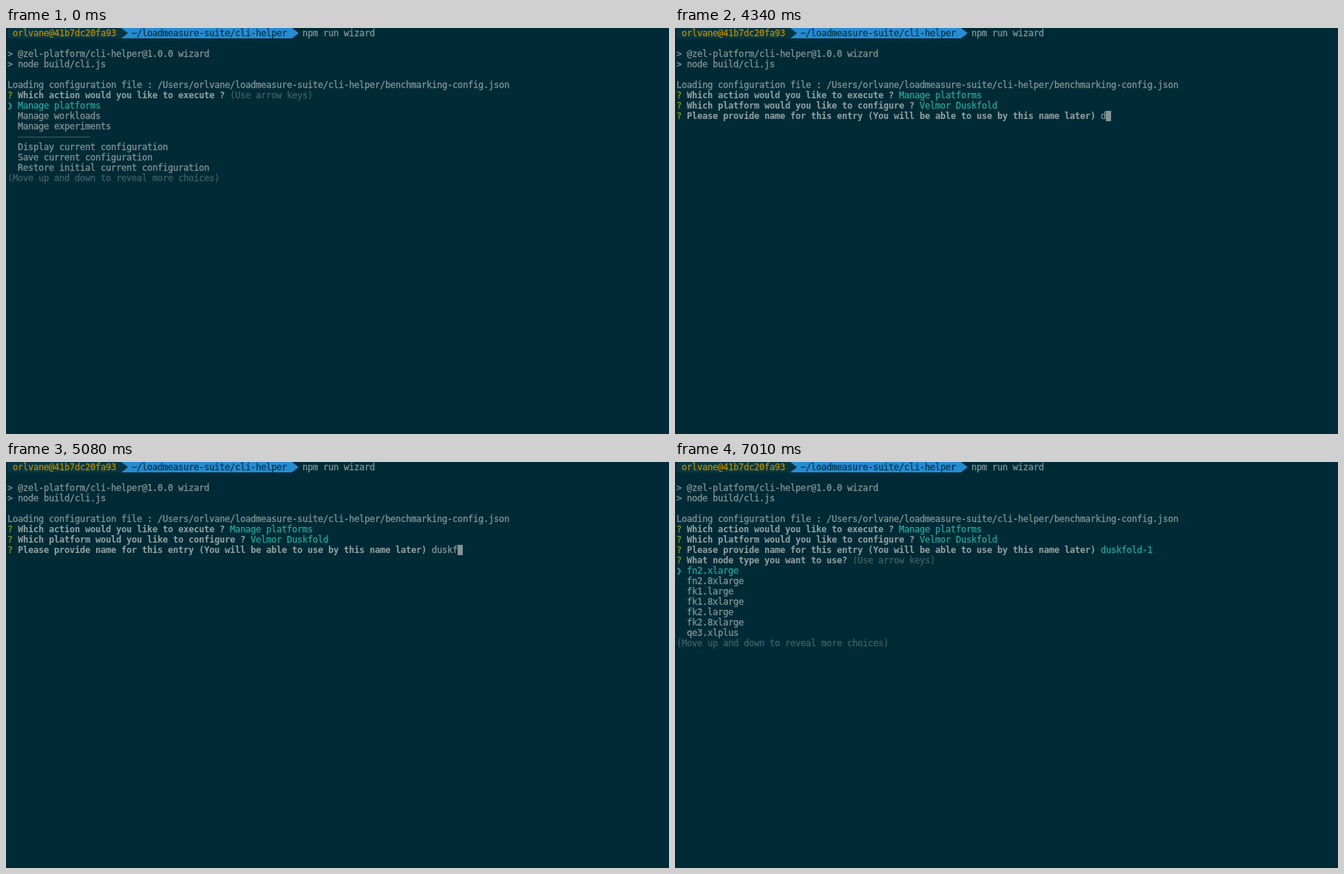
These frames come from a looping animation (897x549 px, 8 s). An HTML page with a canvas:

```html
<!DOCTYPE html>
<html lang="en">
<head>
<meta charset="utf-8">
<title>Terminal wizard</title>
<style>
  html, body { margin: 0; width: 100%; height: 100%; overflow: hidden; background: #002b36; }
  canvas { display: block; }
</style>
</head>
<body>
<canvas id="stage" width="897" height="549"></canvas>
<script>
const ctx = document.getElementById('stage').getContext('2d');
const LOOP = 8000, CELL = 7, LINE = 14, LEFT = 2, BASELINE = 11;
const FONT = '12px "DejaVu Sans Mono", "Noto Sans Mono", monospace';
const C = {
  bg: '#002b36', panel: '#073642', text: '#839496', bright: '#93a1a1', dim: '#415f66',
  green: '#859900', cyan: '#2aa198', yellow: '#b58900', blue: '#268bd2'
};

const PLATFORM = 'Velmor Duskfold', ENTRY = 'duskfold-1';
const PLATFORM_AT = 1190, NAME_AT = 2540, NODE_AT = 7010;
const KEY_TIMES = [4340, 4490, 4780, 4930, 5080, 5380, 5520, 5670, 6270, 6410];

const ACTIONS = ['Manage platforms', 'Manage workloads', 'Manage experiments', null,
  'Display current configuration', 'Save current configuration',
  'Restore initial current configuration'];
const PLATFORMS = [PLATFORM, null, 'Return to the previous menu', 'Exit CLI', null];
const NODES = ['fn2.xlarge', 'fn2.8xlarge', 'fk1.large', 'fk1.8xlarge',
  'fk2.large', 'fk2.8xlarge', 'qe3.xlplus'];

const cellX = col => LEFT + col * CELL;

// Every glyph sits on the terminal's whole-pixel cell grid.
function write(row, col, text, color = C.text, bold = false) {
  ctx.font = (bold ? 'bold ' : '') + FONT;
  ctx.fillStyle = ctx.strokeStyle = color;
  ctx.lineWidth = 0.3;
  [...text].forEach((ch, i) => {
    if (ch === ' ') return;
    const x = cellX(col + i), y = row * LINE + BASELINE;
    ctx.fillText(ch, x, y);
    if (!bold) ctx.strokeText(ch, x, y);
  });
}

function box(row, col, cells, color) {
  ctx.fillStyle = color;
  ctx.fillRect(cellX(col), row * LINE, cells * CELL, LINE);
}

function arrow(col, color) {
  const x = cellX(col);
  ctx.fillStyle = color;
  ctx.beginPath();
  ctx.moveTo(x, 0);
  ctx.lineTo(x + 9, LINE / 2);
  ctx.lineTo(x, LINE);
  ctx.fill();
}

function header() {
  box(0, 0, 22, C.panel);
  box(0, 22, 33, C.blue);
  arrow(22, C.panel);
  arrow(55, C.blue);
  write(0, 1, 'orlvane@41b7dc20fa93', C.yellow);
  write(0, 24, '~/loadmeasure-suite/cli-helper', C.panel);
  write(0, 57, 'npm run wizard');
  write(2, 0, '> @zel-platform/cli-helper@1.0.0 wizard');
  write(3, 0, '> node build/cli.js');
  write(5, 0, 'Loading configuration file : ' +
    '/Users/orlvane/loadmeasure-suite/cli-helper/benchmarking-config.json');
}

// Writes a question and returns the column where its answer begins.
function question(row, text) {
  write(row, 0, '?', C.green);
  write(row, 2, text, C.bright, true);
  return text.length + 3;
}

function answered(row, text, answer) {
  write(row, question(row, text), answer, C.cyan);
}

function menu(row, text, items, more = false) {
  write(row, question(row, text), '(Use arrow keys)', C.dim);
  write(row + 1, 0, '❯', C.cyan);
  items.forEach((item, i) => {
    const r = row + 1 + i;
    if (item) return write(r, 2, item, i ? C.text : C.cyan);
    ctx.fillStyle = C.dim;
    ctx.fillRect(cellX(2), r * LINE + 7, 14 * CELL, 1);
  });
  if (more) write(row + 1 + items.length, 0, '(Move up and down to reveal more choices)', C.dim);
}

function draw(t) {
  ctx.fillStyle = C.bg;
  ctx.fillRect(0, 0, 897, 549);
  header();

  const askAction = 'Which action would you like to execute ?';
  if (t < PLATFORM_AT) return menu(6, askAction, ACTIONS, true);
  answered(6, askAction, ACTIONS[0]);

  const askPlatform = 'Which platform would you like to configure ?';
  if (t < NAME_AT) return menu(7, askPlatform, PLATFORMS);
  answered(7, askPlatform, PLATFORM);

  const askName = 'Please provide name for this entry (You will be able to use by this name later)';
  if (t < NODE_AT) {
    const typed = KEY_TIMES.filter(key => key <= t).length;
    const col = question(8, askName);
    write(8, col, ENTRY.slice(0, typed));
    box(8, col + typed, 1, C.text);
    return;
  }
  answered(8, askName, ENTRY);
  menu(9, 'What node type you want to use?', NODES, true);
}

function tick() {
  draw(performance.now() % LOOP);
  requestAnimationFrame(tick);
}
tick();
</script>
</body>
</html>
```
